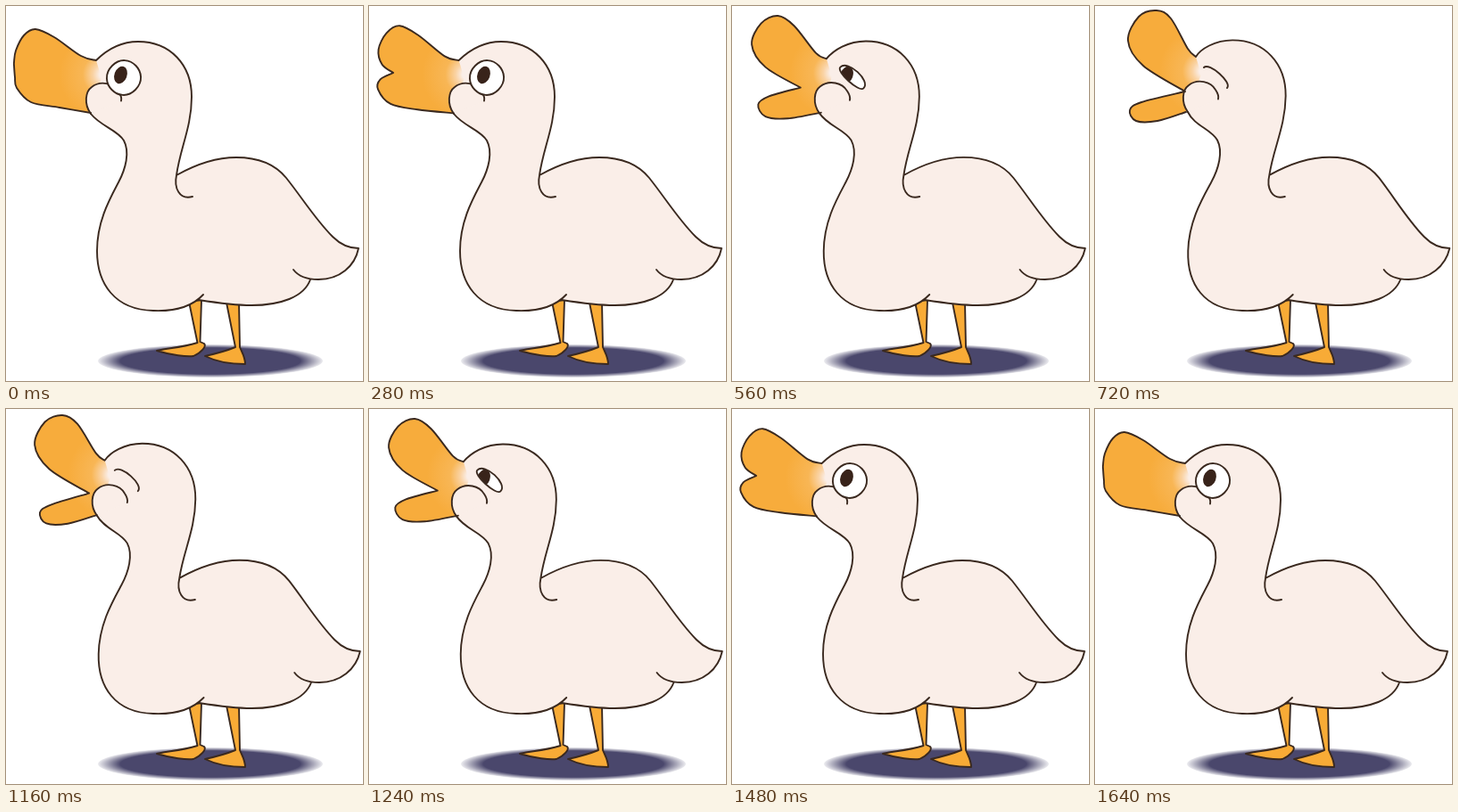
Animation, 400 px wide and 421 px high, one loop 1840 ms. Source, as an HTML page:

```html
<!DOCTYPE html>
<html lang="en">
<head>
<meta charset="utf-8">
<title>Quacking duck</title>
<style>
  html, body { margin: 0; width: 100%; height: 100%; overflow: hidden; background: #fff; }
  svg { display: block; width: 100%; height: 100%; }
  .skin { fill: #faeee8; }
  .orange { fill: #f8ab36; }
  .line { stroke: #3a291f; stroke-width: 1.9; stroke-linecap: round; stroke-linejoin: round; }
  .open { fill: none; }
</style>
</head>
<body>
<svg viewBox="0 0 400 421">
  <defs>
    <radialGradient id="shade">
      <stop offset=".8" stop-color="#4a476c"/>
      <stop offset="1" stop-color="#4a476c" stop-opacity=".1"/>
    </radialGradient>
    <radialGradient id="blush" gradientUnits="userSpaceOnUse" r="50">
      <stop offset=".1" stop-color="#faeee8"/>
      <stop offset=".25" stop-color="#fad3a4"/>
      <stop offset=".48" stop-color="#f8b655"/>
      <stop offset="1" stop-color="#f7ac3c"/>
    </radialGradient>
    <path id="lids"/>
    <clipPath id="eyeClip"><use href="#lids"/></clipPath>
  </defs>
  <ellipse cx="229" cy="398.5" rx="126" ry="18.5" fill="url(#shade)"/>
  <g class="orange line">
    <path d="M205,332L214.5,378C195,384 180,384 169,387C185,392 203,394 210,393C219,389 225,382 222,379L217.5,377L219,330Z"/>
    <path d="M247,333L257,383C245,388 232,391 223,393C235,399 250,402 268,402C268,394 264,388 262,383L261,333Z"/>
  </g>
  <path id="body" class="skin"/>
  <path id="bill" fill="url(#blush)"/>
  <path id="cheek" class="skin line" d="M95,121C87,110 89,96 96,91C106,83 121,87 126,96C128,99 130,103 129,106.5"/>
  <path id="outline" class="open line"/>
  <use href="#lids" fill="#fff"/>
  <g clip-path="url(#eyeClip)">
    <ellipse rx="7" ry="10" fill="#38231a" transform="translate(128.5 77.5) rotate(20)"/>
  </g>
  <use href="#lids" class="open line"/>
</svg>
<script>
const LOOP = 1840;

// Start time and gape: 0 shut, 1 half open, 2 thrown wide
const TIMELINE = [
  [0, 0], [280, .38], [400, .7], [480, 1], [520, 1.22], [560, 1.45], [640, 1.82], [720, 2],
  [1160, 1.82], [1240, 1.45], [1320, 1.22], [1360, 1], [1400, .7], [1480, .38], [1640, 0]
];

// Each follows on from the bill's root, clockwise round the body to the cheek
const HEAD = 'C112,50 128,40 148,40C184,40 208,66 208,102C208,136 195,160 191,190';
const BACK = 'C214,177 236,170 258,170C283,170 301,177 314,193C333,217 347,240 366,259C374,267 384,272 395,272';
const TAIL = 'C391,292 374,307 350,307C338,307 328,304 322,296';
const RUMP = '341,307C334,327 307,336 275,336C255,336 235,333 216,330';
const FRONT = '221,324C208,338 188,343 165,342C122,341 102,312 102,275C102,242 116,217 126,198' +
  'C134,183 139,164 132,151C125,139 106,135 ';
const CURL = 'M191,190C188,204 194,218 209,214';

const pts = s => s.split(' ').map(p => p.split(',').map(Number));

// Key shapes at gape 0, 1 and 2
const UPPER = [
  '101,61 84,56 54,35 33,26 20,33 11,50 9,63 9,67',
  '100,61 86,57 57,29 37,16 19,26 10,47 24,70 57,88',
  '113,57 104,48 85,14 69,5 49,12 37,39 54,67 101,96'
].map(pts);
const JAW = [
  '10,80 12,92 28,108 60,114 95,120',
  '17,86 7,96 18,113 45,120 95,121',
  '52,108 39,117 46,129 70,129 102,119'
].map(pts);

const $ = id => document.getElementById(id);
const set = (id, attrs) => Object.entries(attrs).forEach(([k, v]) => $(id).setAttribute(k, v));
const clamp = v => Math.max(0, Math.min(1, v));

function blend(keys, g) {
  const i = Math.min(1, Math.floor(g));
  return keys[i].map((p, n) => p.map((v, j) => v + (keys[i + 1][n][j] - v) * (g - i)));
}

// Smooth curve through the points, without the leading command
function curve(p) {
  const at = i => p[Math.max(0, Math.min(p.length - 1, i))];
  return p.slice(1).reduce((d, c, i) => {
    const [a, b, e] = [at(i - 1), p[i], at(i + 2)];
    const c1 = b.map((v, j) => v + (c[j] - a[j]) / 6);
    const c2 = c.map((v, j) => v - (e[j] - b[j]) / 6);
    return `${d}C${c1} ${c2} ${c}`;
  }, p[0].join());
}

// The body sways back, most at the head and not at all at the feet
const sway = (d, lean) => d.replace(/([\d.]+),([\d.]+)/g, (_, x, y) => [
  +x + 6.2 * lean * (1 - (y / 345) ** 2),
  y - 2 * lean * Math.max(0, 1 - y / 200)
].join());

function draw(gape) {
  const wide = clamp(gape - 1);
  const lean = wide ** 1.4;
  const upper = blend(UPPER, gape);
  const corner = upper[upper.length - 1];
  const jaw = curve([corner, ...blend(JAW, gape < 1 ? gape : 2 - (1 - wide) ** 2)]);
  const [rootX, rootY] = upper[0];

  const root = `M${rootX},${rootY}`;
  const top = 'M' + curve(upper);
  const spine = root + sway(HEAD + BACK + TAIL, lean);
  const rump = sway(RUMP, lean);
  const front = sway(FRONT, lean) + [95 + 9 * lean, 121 - 2 * lean];

  set('body', { d: `${spine}L${rump}L${front}Z` });
  set('bill', { d: `${top}L${jaw}L${rootX + 6},${rootY + 20}Z` });
  set('blush', { cx: rootX + 9, cy: rootY + 16 });
  set('cheek', { transform: `translate(${9 * lean} ${-2 * lean})` });
  set('outline', { d: `${spine}M${rump}M${front}${sway(CURL, lean)}${top}M${jaw}` });

  // Two lids bulge apart from the eye's corners; the lower one rises to meet the upper
  const lid = clamp((gape - .4) / .6);
  const up = 18 - 7.5 * lid - 4.5 * wide;
  const down = Math.max(-up, 18 - 7.5 * lid - 27 * wide ** 2);
  const squint = (18 - up) / 12;
  const inner = [119 + 3 * squint, 67 + 2 * squint];
  const outer = [145 + 3 * squint, 94 - 2 * squint];
  const off = ([x, y], h) => [x + h, y - h];
  set('lids', {
    d: `M${inner}C${off(inner, up)} ${off(outer, up)} ${outer}` +
       `C${off(outer, -down)} ${off(inner, -down)} ${inner}Z`
  });
}

let shown;
function tick() {
  const t = performance.now() % LOOP;
  const gape = TIMELINE.filter(([start]) => start <= t).pop()[1];
  if (gape !== shown) draw(shown = gape);
  requestAnimationFrame(tick);
}
tick();
</script>
</body>
</html>
```
